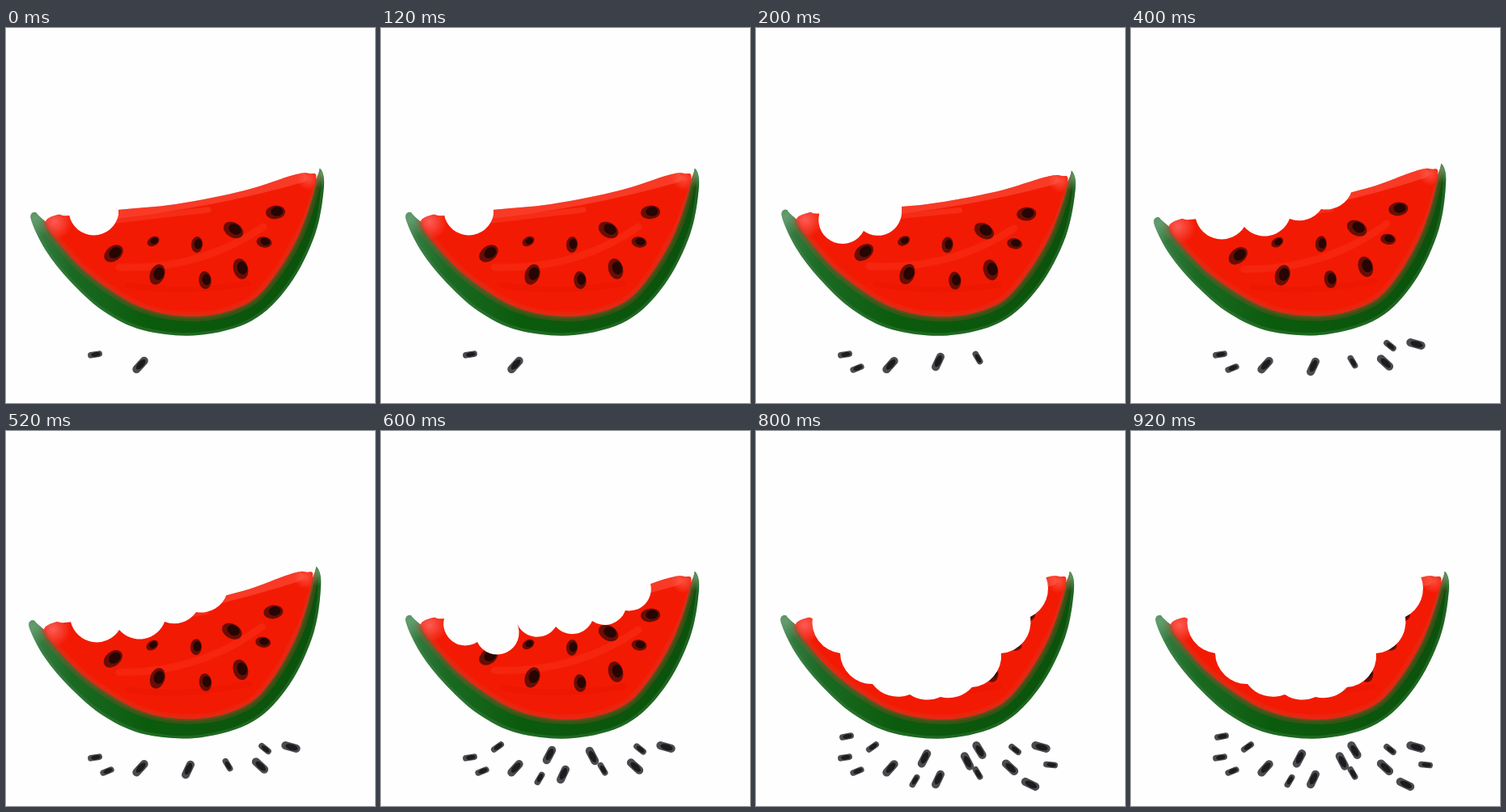
These frames come from a looping animation (456 by 464 pixels, 1 s). An HTML page with a canvas:

```html
<!DOCTYPE html>
<html lang="en">
<head>
<meta charset="utf-8">
<title>Watermelon</title>
<style>
  html, body { margin: 0; width: 100%; height: 100%; overflow: hidden; background: #fefefe; }
  canvas { display: block; }
</style>
</head>
<body>
<canvas id="stage" width="456" height="464"></canvas>
<script>
const ctx = document.getElementById('stage').getContext('2d');
const PAPER = '#fefefe';
const STEP = 200;
const rad = deg => deg * Math.PI / 180;

// Closed Catmull-Rom curve through x,y pairs
function blob(...v) {
  const n = v.length / 2;
  const at = i => { const k = ((i + n) % n) * 2; return [v[k], v[k + 1]]; };
  const path = new Path2D();
  path.moveTo(...at(0));
  for (let i = 0; i < n; i++) {
    const [a, b, c, d] = [at(i - 1), at(i), at(i + 1), at(i + 2)];
    path.bezierCurveTo(b[0] + (c[0] - a[0]) / 6, b[1] + (c[1] - a[1]) / 6,
      c[0] - (d[0] - b[0]) / 6, c[1] - (d[1] - b[1]) / 6, c[0], c[1]);
  }
  path.closePath();
  return path;
}

const rind = blob(
  36, 228, 31, 237, 49, 275, 79, 313, 120, 350, 170, 374, 238, 380, 304, 362,
  350, 318, 382, 255, 393, 195, 388, 174, 383, 188, 345, 270, 240, 335, 110, 290, 47, 238);

const flesh = blob(
  49, 240, 64, 231, 78, 232, 138, 225, 210, 218, 295, 201, 355, 182, 375, 180, 383, 189,
  362, 256, 326, 315, 292, 344, 235, 357, 168, 346, 104, 306, 62, 262);

// Seeds in the flesh: x, y, radius, tilt
const pips = [
  [133, 279, 13, -38], [182, 264, 8, -30], [236, 268, 10, 95],
  [187, 305, 13, -70], [246, 312, 11, 85], [290, 298, 13, 75],
  [281, 250, 13, 30], [319, 265, 9.5, 10], [333, 228, 12, -5]
];

// Landing spots, in the order the seeds drop
const spots = [
  [110, 404], [166, 417], [125, 421], [225, 413], [274, 408], [314, 414], [320, 393], [352, 391],
  [144, 391], [208, 401], [196, 430], [261, 402], [112, 378], [276, 395], [364, 413], [339, 437]
];

// Body tilt, number of dropped seeds, mouth radius, corners between bites
const scenes = [
  { tilt: 0, drops: 2, mouth: 31, edge: [[78, 231], [139, 231]] },
  { tilt: 1, drops: 5, mouth: 29.5, edge: [[78, 231], [133, 251], [180, 225]] },
  { tilt: -2, drops: 8, mouth: 33, edge: [[80, 236], [140, 246], [196, 236], [235, 224], [273, 201]] },
  { tilt: 0, drops: 12, mouth: 27, edge: [[78, 232], [119, 261], [168, 238], [216, 242], [261, 235], [302, 222], [333, 189]] },
  { tilt: 0, drops: 16, mouth: 39, edge: [[70, 230], [104, 275], [144, 313], [190, 326], [228, 329], [267, 317], [303, 275], [339, 230], [358, 180]] }
];

function stroke(path, width, color) {
  ctx.lineWidth = width;
  ctx.strokeStyle = color;
  ctx.stroke(typeof path === 'string' ? new Path2D(path) : path);
}

function inside(path, draw) {
  ctx.save();
  ctx.clip(path);
  draw();
  ctx.restore();
}

function ellipse(x, y, rx, ry, deg, color) {
  ctx.fillStyle = color;
  ctx.beginPath();
  ctx.ellipse(x, y, rx, ry, rad(deg), 0, Math.PI * 2);
  ctx.fill();
}

function glow(x, y, r, rgb) {
  const g = ctx.createRadialGradient(x, y, 0, x, y, r);
  g.addColorStop(0, `rgba(${rgb},.7)`);
  g.addColorStop(1, `rgba(${rgb},0)`);
  ctx.fillStyle = g;
  ctx.fillRect(x - r, y - r, r * 2, r * 2);
}

function drawRind() {
  const green = ctx.createLinearGradient(30, 0, 390, 0);
  green.addColorStop(0, '#3c8049');
  green.addColorStop(.14, '#1b6a23');
  green.addColorStop(.4, '#0b5b0d');
  green.addColorStop(1, '#0b520c');
  ctx.fillStyle = green;
  ctx.fill(rind);
  inside(rind, () => {
    stroke(rind, 7, 'rgba(80,140,85,.3)');
    glow(36, 236, 24, '120,170,130');
    glow(389, 180, 18, '120,170,125');
  });
}

function drawFlesh() {
  ctx.fillStyle = '#f31a03';
  ctx.fill(flesh);
  inside(flesh, () => {
    stroke('M130 230Q250 218 366 185', 12, 'rgba(255,105,90,.4)');
    stroke('M138 238Q195 231 250 225', 7, 'rgba(255,95,80,.25)');
    stroke('M140 296Q240 300 318 246', 9, 'rgba(255,80,55,.2)');
    stroke('M150 318Q220 330 300 316', 7, 'rgba(220,15,0,.25)');
    glow(60, 240, 22, '255,120,120');
    glow(374, 186, 15, '255,100,85');
  });
  // Wet blend where flesh meets rind
  inside(rind, () => {
    stroke(flesh, 12, 'rgba(205,75,50,.22)');
    stroke(flesh, 5, 'rgba(190,65,40,.3)');
  });
}

function drawPip([x, y, r, deg]) {
  ellipse(x, y, r, r * .7, deg, 'rgba(80,12,6,.85)');
  ellipse(x + r * .15, y - r * .08, r * .62, r * .48, deg, '#260503');
}

// Dropped seeds fan out below the melon; the middle ones get pushed down over time
function drawFallen(i, scene) {
  const [x, y] = spots[i];
  const age = scene - scenes.findIndex(s => s.drops > i);
  const push = 8 * age * Math.max(0, 1 - Math.abs(x - 245) / 80);
  const dx = x - 235;
  const r = 9 + 3 * (i % 2);
  const w = r * .42;
  ctx.save();
  ctx.translate(x, y + push);
  ctx.rotate(rad(65 * Math.sign(dx) * (1 - (dx / 135) ** 2)));
  stroke(`M${w - r} 0H${r - w}`, w * 2, '#4c4c50');
  ellipse(1, 0, r * .65, w * .72, 0, '#1c1c1f');
  ctx.restore();
}

function drawBites({ edge, mouth }) {
  const [first, ...rest] = edge;
  const arcs = rest.map(p => `A${mouth} ${mouth} 0 0 0 ${p}`).join('');
  ctx.fillStyle = PAPER;
  ctx.fill(new Path2D(`M${first}${arcs}V150H${first[0]}Z`));
}

function draw(index) {
  const scene = scenes[index];
  ctx.fillStyle = PAPER;
  ctx.fillRect(0, 0, 456, 464);
  ctx.save();
  ctx.translate(215, 300);
  ctx.rotate(rad(scene.tilt));
  ctx.translate(-215, -300);
  drawRind();
  drawFlesh();
  pips.forEach(drawPip);
  ctx.restore();
  drawBites(scene);
  for (let i = 0; i < scene.drops; i++) drawFallen(i, index);
}

ctx.lineCap = ctx.lineJoin = 'round';
const start = performance.now();

function tick() {
  const t = performance.now() - start;
  draw(Math.floor(t / STEP) % scenes.length);
  requestAnimationFrame(tick);
}
tick();
</script>
</body>
</html>
```
